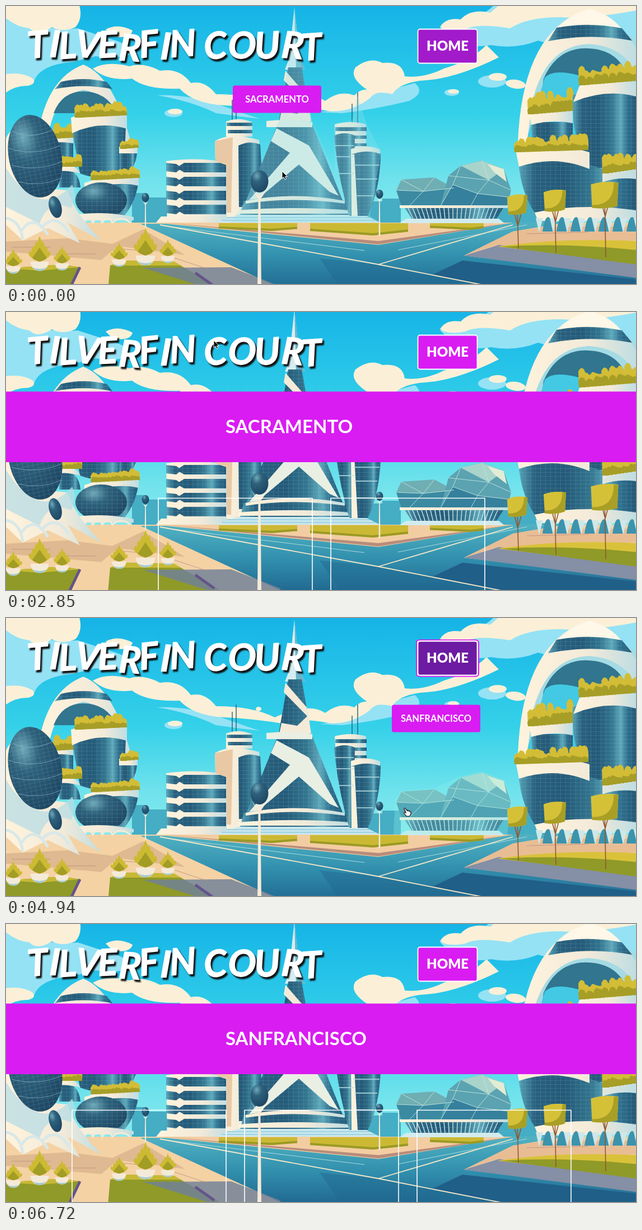
Write an HTML page that moves like this. It is 1125x498 px and loops after 8 s.

```html
<!DOCTYPE html>
<html lang="en">
<head>
<meta charset="utf-8">
<title>City picker</title>
<style>
html, body { margin: 0; width: 100%; height: 100%; overflow: hidden; background: #29c5e9; }
svg { display: block; width: 1125px; height: 498px; }
text { font-family: Lato, "Open Sans", sans-serif; fill: #fff; font-weight: 700; }
#title { font-size: 66px; font-style: italic; stroke: #fff; stroke-width: 1.5; stroke-linejoin: round; filter: drop-shadow(3px 4px 1px #111); }
.name { font-size: 16.5px; text-anchor: middle; }
</style>
</head>
<body>
<svg id="stage" viewBox="0 0 1125 498" xmlns="http://www.w3.org/2000/svg">
  <defs>
    <linearGradient id="sky" x2="0" y2="1">
      <stop offset="0" stop-color="#14b2e6"/><stop offset=".2" stop-color="#21bfe8"/>
      <stop offset=".5" stop-color="#35d1e9"/><stop offset=".78" stop-color="#6fe2ec"/><stop offset="1" stop-color="#8debec"/>
    </linearGradient>
    <linearGradient id="road" x2="0" y2="1">
      <stop offset="0" stop-color="#52b3c3"/><stop offset=".5" stop-color="#3290ae"/><stop offset="1" stop-color="#20678f"/>
    </linearGradient>
    <linearGradient id="pane">
      <stop offset="0" stop-color="#57a3b7"/><stop offset=".14" stop-color="#29607e"/><stop offset=".4" stop-color="#245a78"/>
      <stop offset=".62" stop-color="#33758f"/><stop offset=".76" stop-color="#5fa9bb"/><stop offset=".86" stop-color="#2f7190"/><stop offset="1" stop-color="#245876"/>
    </linearGradient>
    <linearGradient id="wall">
      <stop offset="0" stop-color="#fff3dc"/><stop offset=".6" stop-color="#f2ead9"/><stop offset="1" stop-color="#bfdde2"/>
    </linearGradient>
    <radialGradient id="orb" cx=".35" cy=".25" r=".8">
      <stop offset="0" stop-color="#6fa9b9"/><stop offset=".35" stop-color="#2e617c"/><stop offset="1" stop-color="#1d4562"/>
    </radialGradient>
    <pattern id="grid" width="9" height="7" patternUnits="userSpaceOnUse">
      <path d="M0 .5H9M.5 0V7" stroke="#a9d9e2" stroke-opacity=".2" stroke-width=".7"/>
    </pattern>
    <clipPath id="deck"><rect x="734" y="334" width="274" height="180"/></clipPath>
  </defs>
  <g id="scene"></g>
  <g id="city">
    <g id="cards" fill="none" stroke="#fff" stroke-width="1.6"></g>
    <g clip-path="url(#deck)"><g id="panel">
      <rect y="334" width="275" height="180" fill="#d91cf2"/>
      <path d="M0 459H3V456H6V459H10V469H1V466H7V462H0z" fill="#fff"/>
    </g></g>
    <rect y="142.500" width="1125" height="126.500" fill="#d91cf2"/>
    <text id="heading" x="392" y="216.500" font-size="33"></text>
  </g>
  <text id="title" x="40" y="88" rotate="-5 3 -4 6 -3 4 -6 3 -4 0 -5 4 -3 5 -4" dy="6 -3 4 -5 3 4 -4 2 -3 0 4 -4 3 -3 6">TILVERFIN COURT</text>
  <rect id="ring" x="733" y="39.500" width="111" height="65" rx="5" fill="#fff" stroke="#d91cf2" stroke-width="2"/>
  <rect id="home" x="735.500" y="41.500" width="106" height="61" rx="4" stroke="#fff" stroke-width="1.800"/>
  <text x="788.500" y="80" font-size="24" style="font-weight:900" text-anchor="middle">HOME</text>
  <g id="pill">
    <rect width="158" height="49" rx="3.500" fill="#d91cf2"/>
    <text id="pillName" class="name" x="79" y="30"></text>
  </g>
  <path id="arrow" d="M0 0V13L3 10.300 5.200 15 7.500 14 5.400 9.600H9.500z" fill="#000" stroke="#fff"/>
  <path id="hand" d="M-2 -1L-4 -5Q-4 -7 -2 -6L1 -2 2 -3 3 -1 5 -2 6 0 8 0V4L6 8H0L-4 3Q-5 1 -3 1L-1 2z" fill="#fff" stroke="#111" stroke-width="1.200"/>
</svg>
<script>
const $ = id => document.getElementById(id);
const CREAM = '#fbf0d7', PALE = '#95e2f5', STONE = '#f4ead8';
let art = '', seed = 7;
const rnd = () => (seed = seed * 16807 % 2147483647) / 2147483647;
const shape = (fill, d, extra = '') => art += `<path fill="${fill}" d="${d}" ${extra}/>`;
const line = (color, width, d) => shape('none', d, `stroke="${color}" stroke-width="${width}"`);
const oval = (fill, x, y, rx, ry, turn = 0) =>
  art += `<ellipse cx="${x}" cy="${y}" rx="${rx}" ry="${ry}" fill="${fill}" transform="rotate(${turn} ${x} ${y})"/>`;
const glass = d => { shape('url(#pane)', d); shape('url(#grid)', d); };
const wall = d => shape('url(#wall)', d);

function bush(x1, y1, x2, y2, h) {
  const n = Math.round((x2 - x1) / 7);
  for (const [color, k, drop] of [['#d3bd36', 1, 0], ['#a79e27', .5, 2]]) {
    let d = '';
    for (let i = 0; i <= n; i++) {
      const x = x1 + (x2 - x1) * i / n, y = y1 + (y2 - y1) * i / n + drop;
      const top = y - h * k * (.55 + .5 * rnd());
      d += `M${x - 6} ${y}L${x - 7} ${top + 5}Q${x - 2} ${top - 4} ${x} ${top}Q${x + 7} ${top - 2} ${x + 6} ${y}z`;
    }
    shape(color, d);
  }
}

function pot(x, y, h, w) {
  for (const [color, k] of [['#ccba33', 1], ['#a29d24', .55]])
    for (const a of [-3, 3, -2, 2, -1, 1, 0]) {
      const tx = x + a * w * .17 * k, ty = y - h * k * (1 - Math.abs(a) * .19);
      shape(color, `M${x} ${y}Q${tx - w * .3} ${(y + ty) / 2} ${tx} ${ty}Q${tx + w * .3} ${(y + ty) / 2} ${x} ${y}`);
    }
  const r = w / 2;
  shape(STONE, `M${x - r} ${y}H${x + r}Q${x + r - 2} ${y + r} ${x} ${y + r}T${x - r} ${y}`);
  shape('#9fc8d2', `M${x - r + 3} ${y + r * .6}Q${x} ${y + r} ${x + r - 3} ${y + r * .6}Q${x + r * .4} ${y + r} ${x} ${y + r}T${x - r + 3} ${y + r * .6}`);
}

function tree(x, y, w, h, foot) {
  line('#93572f', 1.6, `M${x} ${y}L${x + 2} ${foot}M${x - 6} ${y + 12}L${x + 1} ${y + 38}L${x + 8} ${y + 12}`);
  shape('#d5c138', `M${x - w / 2} ${y - h / 2 + 3}Q${x} ${y - h / 2 - 4} ${x + w / 2} ${y - h / 2}L${x + w / 2 - 2} ${y + h / 2 - 3}Q${x} ${y + h / 2 + 3} ${x - w / 2 + 2} ${y + h / 2}z`);
  shape('#a99f25', `M${x + w / 2} ${y - h / 2}L${x + w / 2 - 2} ${y + h / 2 - 3}Q${x} ${y + h / 2 + 3} ${x - w / 2 + 2} ${y + h / 2}V${y + h / 2 - 5}Q${x + w / 3} ${y + h / 2 - 4} ${x + w / 3} ${y - h / 2}z`);
}

function lamp(x, y, r, foot) {
  shape(STONE, `M${x - r} ${y + r * .7}Q${x} ${y + r * 2.3} ${x + r} ${y + r * .7}L${x + r * .12} ${y + r * 2}L${x + r * .22} ${foot}H${x - r * .22}L${x - r * .12} ${y + r * 2}z`);
  oval('url(#orb)', x, y, r, r * 1.25);
}

function sky() {
  shape('url(#sky)', 'M0 -10H1125V400H0z');
  shape(PALE, 'M0 20Q70 45 128 40L190 60Q225 70 220 88Q190 95 160 90L120 100Q60 105 50 135Q20 150 0 145z');
  shape(CREAM, 'M0 -10H128Q140 20 124 38Q100 48 82 38Q55 55 42 40Q20 38 0 22z');
  shape(CREAM, 'M0 122Q30 118 48 130Q55 140 38 143Q18 142 0 155zM178 42Q200 30 226 44Q222 60 190 54z');
  shape(PALE, 'M270 160Q330 158 390 180Q445 200 455 202Q415 198 375 192Q330 170 270 160M560 190Q620 185 650 160L730 138Q750 155 720 170Q660 185 600 192z');
  shape(CREAM, 'M155 112Q180 98 220 108Q245 100 275 116Q310 110 330 138Q355 132 375 158Q440 158 480 178Q540 150 570 170Q595 150 622 160Q634 148 645 150Q612 128 624 110Q650 90 672 102Q708 98 712 126Q745 130 782 112Q830 98 858 70L880 92Q800 132 738 134Q700 140 690 158Q660 150 650 165Q615 192 575 188Q530 178 500 190Q440 180 390 178Q335 175 310 148Q250 150 225 130Q180 135 155 112z');
  shape(PALE, 'M775 40Q845 25 870 0H1125V72Q1040 88 950 62Q910 78 866 70Q815 80 775 40z');
  shape(CREAM, 'M775 38Q785 20 812 24Q830 4 865 12L890 -10H1125V8Q1040 24 990 20Q930 20 900 40Q840 30 820 42Q790 48 775 38z');
  oval(PALE, 868, 135, 25, 11); oval(CREAM, 878, 127, 16, 7);
  oval(CREAM, 910, 140, 18, 8, 8); oval(PALE, 796, 155, 13, 6); oval(CREAM, 799, 153, 10, 4);
  oval(PALE, 299, 192, 16, 7); oval(CREAM, 302, 189, 13, 5); oval(CREAM, 451, 163, 5, 4);
  shape('#45adc4', 'M225 390V335H250V343H287V390zM645 390V350H672V345H705V390zM865 390V362H890V350H920V342H970V390z');
}

function ground() {
  shape('#f4d2a4', 'M0 388H1125V510H0z');
  shape('#dfb991', 'M0 422L110 416 190 426 245 400 320 446 200 430 170 455 0 440z');
  shape('url(#road)', 'M240 390H285L665 428 905 388 1010 386 905 404 818 447 1125 485V510H500z');
  shape('#205f88', 'M815 456L1125 490V510H900L760 482z');
  shape('#1f668f', 'M560 452L667 463 900 510H600z', 'opacity=".45"');
  line('#a9dadd', 1, 'M300 396L640 438M700 437L930 392');
  line('#f3e7c9', 1.8, 'M275 392L665 463L905 510M665 463L905 392');
  shape('#f3cda2', 'M280 388H905L665 424z');
  shape('#b98c7b', 'M280 388L665 421 905 388 665 427z');
  for (const [a, b, h] of [[380, 520, 14], [543, 718, 22], [757, 853, 12]]) {
    shape('#cbb934', `M${a} 389H${b}V${389 + h * .7}L${(a + b) / 2 + 25} ${389 + h}L${a} ${389 + h * .6}z`);
    line('#9b9a24', 4, `M${a} ${389 + h * .55}L${(a + b) / 2 + 25} ${387 + h}L${b} ${389 + h * .6}`);
  }
  shape('#e8bd94', 'M905 404L960 395H1125V420L870 430 818 447z');
  shape('#858fa6', 'M818 447L880 428 1125 462V487z');
  shape('#d9c23a', 'M878 431Q980 415 1125 421V460z');
  shape('#8f9a28', 'M885 431Q1000 424 1125 437V463z');
  shape('#8f9a28', 'M0 470L100 463 132 468 115 510H0zM182 510L186 465 205 456 300 458 390 510z');
  shape('#c7b934', 'M0 470L100 463 132 468 60 474zM186 465L205 456 300 458 312 465z');
  shape('#70809a', 'M245 469L402 468 490 502V510H375z', 'opacity=".82"');
  line('#65548a', 5, 'M338 478L372 502M132 468L112 510');
  line('#b68d82', .8, 'M10 432H80M90 444H160M205 435L250 439M300 451L360 471M930 408L1040 405');
}

function leftTowers() {
  shape('#9dd4df', 'M62 215Q78 135 138 108Q202 138 226 260L207 250 190 170 88 170 78 220z');
  wall('M60 215Q78 128 138 105Q202 130 232 285L218 265Q198 160 138 150Q90 160 78 220z');
  shape('#31758f', 'M85 192Q100 153 138 153Q180 153 198 192z');
  glass('M98 136Q138 126 180 136L190 149Q138 138 87 149z');
  glass('M80 240H120V285Q100 285 84 295z'); wall('M78 234H120V246Q98 242 78 246z'); bush(84, 236, 115, 234, 25);
  glass('M117 215Q165 200 214 215L211 290Q180 318 132 300z');
  wall('M116 200Q165 180 216 196V220Q165 205 118 228z'); bush(129, 198, 210, 194, 23);
  glass('M203 262H234Q232 285 222 294H203z'); wall('M202 252H235V264H202z'); bush(210, 254, 231, 252, 15);
  glass('M95 290Q130 290 133 325H95z'); wall('M95 284Q125 282 133 300Q110 294 95 296z'); bush(103, 286, 130, 286, 20);
  glass('M140 320Q190 305 236 320Q230 352 212 375H140z'); wall('M140 317Q195 298 237 308V322Q195 312 140 332z'); bush(158, 310, 233, 306, 18);
  oval('url(#orb)', 170, 348, 46, 32); oval('url(#grid)', 170, 348, 46, 32);
  wall('M98 378Q168 364 228 378V384H98z');
  line(STONE, 3, 'M120 380L138 390Q148 374 155 388Q165 372 172 388Q182 372 190 388Q205 374 222 388');
  wall('M0 238Q8 215 28 228L55 325 110 330Q122 370 170 420L110 388 132 425 75 398 30 420 0 392z');
  shape('#b9dce4', 'M0 290Q60 385 118 320Q128 338 116 362Q75 345 60 390L0 360z', 'opacity=".75"');
  oval('url(#orb)', 52, 269, 47, 75, -12); oval('url(#grid)', 52, 269, 47, 75, -12);
  line('#8fbac9', .7, 'M12 225Q50 240 85 220M5 255Q50 270 97 250M10 285Q55 298 102 278M22 315Q60 325 100 308');
  oval('url(#orb)', 88, 360, 11, 20, -15);
  line('#d8e8e8', 5, 'M0 380Q25 384 30 418M28 402Q50 370 75 410M65 395Q90 370 112 405');
}

function centre() {
  wall('M286 278Q340 270 397 280V382H288z');
  for (let i = 0; i < 4; i++) {
    const y = 281 + i * 25;
    glass(`M286 ${y}L304 ${y + 2}L314 ${y + 9}L304 ${y + 17}L286 ${y + 15}zM304 ${y + 9}L318 ${y}H393V${y + 17}H318z`);
  }
  wall('M277 377H400V388H268z');
  line('#32637d', 1.5, 'M404 204V168M411 204V155M618 214V175M628 214V155');
  wall('M373 242Q400 225 452 240L460 378H394V285L374 278z');
  shape('#e9c9a5', 'M373 242L405 235 402 370H394V285L374 278z');
  wall('M393 207Q415 198 440 208V234H393z');
  glass('M394 209H440V215H394zM396 222H440V228H396zM415 250Q435 240 454 248L460 360H416z');
  // spire and cone
  shape('#d6edf1', 'M515 3L505 96 498 114H534L525 95z'); shape('#68b5c9', 'M515 3L518 114H534L525 95z');
  glass('M504 110H528L545 207 603 353H428L487 207z');
  shape(STONE, 'M499 116L537 160 540 178 496 133zM540 174L545 207H488L492 188 520 193z');
  shape('#e9efe3', 'M465 206Q510 201 547 208V217H465z');
  shape('#e9efe3', 'M483 219L541 250 594 340 578 333 523 284 442 352H430L507 263 473 242z');
  glass('M425 349Q515 334 606 349L612 374H418z');
  wall('M428 349Q515 332 605 349V354Q515 341 428 354zM415 366Q515 358 614 366V372H415z');
  shape('#c9e8ef', 'M415 374H640L668 388H372z'); line('#75bccf', 1, 'M395 379H650M385 384H660');
  // twin tower
  wall('M587 212Q615 204 643 212V258H590z'); glass('M588 217H644V224H588zM612 232H644V238H612zM620 246H644V251H620z');
  glass('M586 232Q605 224 623 232L622 300V376H613Q592 305 586 232z');
  glass('M617 262Q645 252 669 264Q668 330 646 376H622z');
  wall('M616 256Q645 247 668 257V265Q645 256 616 266zM616 266H622L628 376H617z');
  line('#b9dfe4', 1.5, 'M587 250H621M590 270H621M595 300H621M620 285H667M622 310H663M624 340H656');
}

function crystal() {
  shape('#6faeb3', 'M697 330L706 311 765 307 800 326 790 358H706z');
  shape('#3b8aa2', 'M697 330L745 332 800 326 790 358H706z');
  shape('#5ba3b1', 'M776 358L790 304 812 286 850 277 889 292 902 330 895 358z');
  shape('#a9d4cb', 'M812 286L850 277 889 292 862 312z'); shape('#e3ecd5', 'M860 283L889 292 894 315 872 298z');
  shape('#35809c', 'M776 358L798 320 842 336 895 342V358z');
  line('#c3e5df', .9, 'M697 330L745 332 765 307M706 311L745 332 720 358M745 332L800 326M790 304L862 312 850 277M812 286L798 320 842 336 862 312 902 330M842 336L830 358M842 336L895 342M776 358L798 320');
  wall('M703 357H897V362H703z'); glass('M712 362H888L874 384H727z');
  let ribs = '';
  for (let x = 718; x < 886; x += 8) ribs += `M${x} 362L${800 + (x - 800) * .88} 383`;
  line('#bfe2e5', 1.5, ribs);
  shape('#d2ebee', 'M715 381H880L890 389H702z');
}

function rightTowers() {
  shape('#a4dbe4', 'M916 235Q935 35 1042 7L1125 60V240z');
  shape('#31758f', 'M960 130Q985 73 1040 76Q1095 78 1112 130V250H945z');
  shape('#43c9e3', 'M962 128Q980 110 1035 128V238H930z');
  wall('M914 245Q922 40 1042 5Q1090 18 1125 75V118Q1100 72 1042 68Q965 70 940 170L930 245z');
  shape('#fff7e8', 'M1042 5Q1000 18 984 42Q1035 28 1100 42Q1080 15 1042 5z');
  glass('M983 39Q1040 28 1100 40L1118 62Q1042 48 968 63z');
  glass('M938 208H1012V250H940z'); wall('M934 190Q975 184 1012 188V210Q975 202 938 213z'); bush(938, 192, 1008, 186, 38);
  glass('M1012 160Q1070 140 1125 158V290H1040Q1010 240 1012 160z');
  wall('M1024 143Q1075 128 1125 136V162Q1070 148 1013 172z'); bush(1029, 140, 1125, 132, 34);
  glass('M915 278Q980 255 1042 284Q1080 300 1125 295V378H950Q920 340 915 278z');
  wall('M911 262Q980 242 1042 262V292Q980 266 916 288zM1065 295Q1100 285 1125 288V310Q1090 306 1065 316z');
  bush(914, 260, 1034, 256, 26); bush(1071, 298, 1125, 290, 30);
  wall('M944 370Q1030 352 1125 366V385H950z');
  for (let x = 958; x < 1125; x += 25) shape('#3c93ad', `M${x} 404Q${x + 4} 378 ${x + 10} 378Q${x + 18} 380 ${x + 19} 404z`);
  for (let x = 946; x < 1125; x += 25) shape('#cfe7e8', `M${x} 380H${x + 13}L${x + 6} 406z`);
}

sky(); ground(); leftTowers(); centre(); crystal(); rightTowers();
shape('#8de0ea', 'M515 6L525 95 547 207 587 300 586 212 618 205 628 160 644 212 670 262 650 376 668 388H402L428 349 487 207 505 96z', 'id="hotCentre" opacity=".3"');
shape('#8deee8', 'M692 388L695 325 706 309 765 305 810 284 850 275 891 291 904 330 895 388z', 'id="hotCrystal" opacity=".3"');
lamp(249, 343, 6.5, 418); lamp(667, 337, 6.5, 412); lamp(452.5, 314, 16, 510);
tree(913, 356, 36, 34, 435); tree(980, 349, 40, 37, 442); tree(1069, 339, 49, 45, 450);
[[13, 466, 30, 27], [60, 458, 46, 33], [100, 461, 31, 25], [202, 454, 30, 26], [249, 447, 50, 35], [289, 448, 30, 25]].forEach(a => pot(...a));
$('scene').innerHTML = art;

// Steps: start time followed by the values held until the next step.
const pointer = [
  [0, 'arrow', 493, 296], [600, 'arrow', 455, 235], [750, 'arrow', 372, 125], [900, 'arrow', 268, 10], [1050, ''],
  [2850, 'arrow', 371, 51], [3000, 'arrow', 525, 72], [3150, 'arrow', 690, 94], [3300, 'arrow', 763, 101],
  [3600, 'hand', 775, 89], [4200, 'hand', 640, 235], [4350, 'hand', 669, 326], [4490, 'arrow', 686, 341],
  [4790, 'hand', 700, 346], [4940, 'hand', 715, 347], [5080, 'hand', 732, 343], [5230, 'hand', 741, 337],
  [5520, 'arrow', 742, 334], [6120, 'arrow', 690, 290], [6270, 'arrow', 560, 195], [6420, 'arrow', 400, 80],
  [6570, 'arrow', 284, 2], [6720, '']
];
const page = [[0, ''], [150, 'SACRAMENTO', 272, 2], [3900, ''], [5670, 'SANFRANCISCO', 118, 3]];
const label = [[0, 'SACRAMENTO', 405, 142.5], [150, ''], [4200, 'SACRAMENTO', 405, 142.5], [4490, ''], [4790, 'SANFRANCISCO', 689, 155.5], [5670, '']];
const button = [[0, '#a21bcb'], [150, '#d91cf2'], [3600, '#a21bcb'], [3750, '#6d1ba3'], [3900, '#6d1ba3', 1], [5520, '#a21bcb'], [5670, '#d91cf2']];
const slide = [[0, 0], [5670, 15], [5820, 95], [5970, 200], [6120, 255], [6270, 190], [6420, 90], [6570, 14], [6720, 0]];
const at = (steps, t) => steps.filter(s => s[0] <= t).pop().slice(1);
const show = (id, on) => $(id).style.display = on ? '' : 'none';
const move = (id, x, y) => $(id).setAttribute('transform', `translate(${x} ${y})`);

function draw() {
  const t = performance.now() % 8000;
  const [city, left, count] = at(page, t);
  show('city', city);
  move('scene', 0, city ? -7 : 0);
  if (city) {
    $('heading').textContent = city;
    let d = '';
    for (let i = 0; i < count; i++) d += `M${left + i * 308} 510V333.500h275V510`;
    $('cards').innerHTML = `<path d="${d}"/>`;
  }
  const [width] = at(slide, t);
  show('panel', width);
  move('panel', 1008 - width, 0);

  const [name, px, py] = at(label, t);
  show('pill', name);
  if (name) { $('pillName').textContent = name; move('pill', px, py); }
  show('hotCentre', name === 'SACRAMENTO');
  show('hotCrystal', name === 'SANFRANCISCO');

  const [fill, focus] = at(button, t);
  $('home').setAttribute('fill', fill);
  show('ring', focus);

  const [kind, x, y] = at(pointer, t);
  for (const id of ['arrow', 'hand']) show(id, id === kind);
  if (kind) move(kind, x, y);
  requestAnimationFrame(draw);
}
draw();
</script>
</body>
</html>
```
